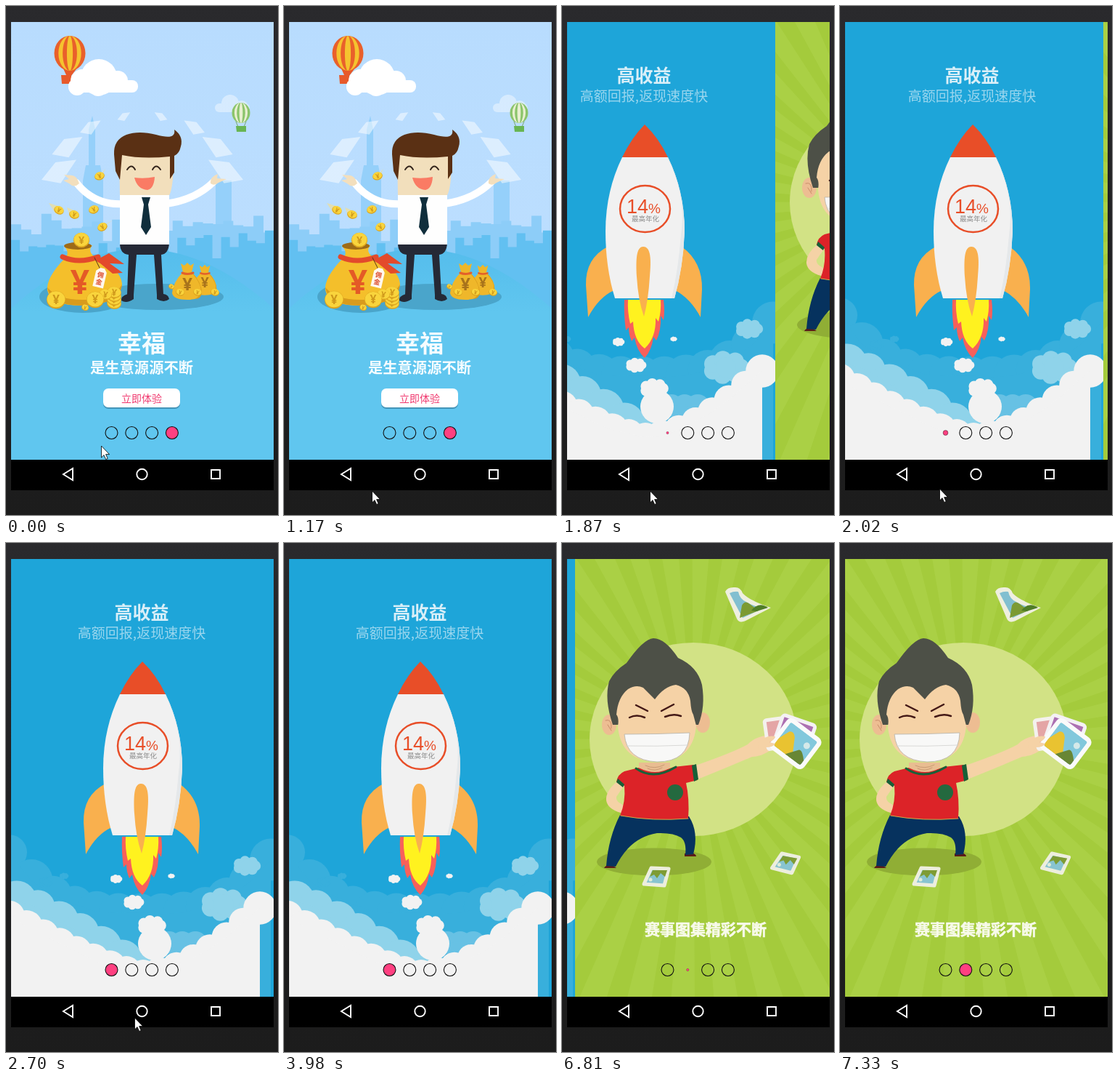
An HTML page for the animation above (8 s loop, 375 px wide and 700 px high).

```html
<!DOCTYPE html>
<html lang="zh">
<head>
<meta charset="utf-8">
<title>Intro pages</title>
<style>
html,body{margin:0;width:100%;height:100%;overflow:hidden;background:#202021}
svg{display:block;width:375px;height:700px}
text{font-family:"Noto Sans CJK SC","Noto Sans CJK",sans-serif;text-anchor:middle}
.num{font-family:"Liberation Sans",Arial,sans-serif;text-anchor:start}
.yen{font-family:"Noto Sans",sans-serif;font-weight:600}
.line{fill:none;stroke-linecap:round}
.heavy{font-weight:900;stroke-width:.6}
</style>
</head>
<body>
<svg viewBox="0 0 375 700">
<defs>
<linearGradient id="desk" x2="0" y2="1"><stop stop-color="#2a2a2d"/><stop offset=".5" stop-color="#202022"/><stop offset="1" stop-color="#1c1c1c"/></linearGradient>
<linearGradient id="sky" x2="0" y2="1"><stop stop-color="#b8dcfe"/><stop offset="1" stop-color="#bfe0ff"/></linearGradient>
<linearGradient id="land" x2="0" y2="1"><stop stop-color="#55bdec"/><stop offset=".3" stop-color="#60c6ef"/></linearGradient>
<clipPath id="screen"><path d="M7 22H369V624H7z"/></clipPath>
<clipPath id="hull"><path d="M157 208H220Q243 255 243 310Q241 360 229 402H147Q134 360 134 310Q134 255 157 208z"/></clipPath>
<clipPath id="picture"><rect x="-23" y="-20" width="46" height="40" rx="3"/></clipPath>
</defs>
<rect width="375" height="700" fill="url(#desk)"/>
<path d="M7 22H369V666H7z"/>
<g clip-path="url(#screen)">

<g class="page"><g clip-path="url(#screen)">
<path fill="#1ea5d9" d="M7 22H369V624H7z"/>
<text class="heavy" x="187" y="105" font-size="25" fill="#d9eff8">高收益</text>
<text x="187" y="131" font-size="19" font-weight="300" fill="#9ad6ee">高额回报,返现速度快</text>
<g id="clouds"></g>
<path fill="#f8605a" d="M160 404H214Q216 420 214 432L210 426Q211 446 204 460L200 455Q198 473 188 484Q177 474 174 456L170 461Q166 452 166 442L162 446Q159 424 160 404z"/>
<path fill="#fff21f" d="M165 404H210Q211 420 207 434L203 429Q204 456 188 471Q173 460 172 434L168 437Q164 420 165 404z"/>
<g fill="#f9b04e"><path d="M137 331Q106 347 107 384L110 428Q125 400 146 391z"/><path d="M239 331Q268 352 267 390L265 428Q251 402 230 391z"/></g>
<g clip-path="url(#hull)"><path fill="#f1f1f1" d="M130 200H250V410H130z"/><path fill="#e5e8ea" d="M219 208Q246 260 238 315Q234 365 225 402H250V200z"/></g>
<path fill="#e84e28" d="M188 163Q207 181 220 208H157Q170 181 188 163z"/>
<path fill="#f9b04e" d="M186 331C197 331 197 350 195 372Q193 405 187 427Q179 405 177 372C176 350 176 331 186 331z"/>
<ellipse cx="188.500" cy="279" rx="34.500" ry="32" fill="none" stroke="#e84e28" stroke-width="2.500"/>
<text class="num" x="163" y="285" font-size="27" fill="#e84e28">14<tspan font-size="19">%</tspan></text>
<text x="189" y="296" font-size="9.500" fill="#8b8b8b">最高年化</text>
</g></g>

<g class="page"><g clip-path="url(#screen)">
<path fill="#aad045" d="M7 22H369V624H7z"/>
<path id="rays" fill="#a4cb3c"/>
<ellipse cx="170" cy="270" rx="143" ry="133" fill="#d2e285"/>
<ellipse cx="116" cy="438.500" rx="79" ry="19" fill="#90ae35"/>
<path fill="#5a1a1a" d="M47 447Q50 442 58 443L64 447zM158 431V427L168 426Q174 428 174 431z"/>
<path fill="#06325e" d="M69 374L164 376Q178 398 170 428L159 429Q161 411 153 405Q142 398 120 399Q96 403 80 420Q70 431 63 445L50 444Q53 405 69 374z"/>
<path fill="#f5d2a6" d="M65 328Q49 341 50 354Q52 366 70 371Q78 375 85 374Q91 367 84 362Q76 363 71 359Q63 355 64 349Q69 341 75 334z"/>
<path fill="#f5d2a6" d="M173 306Q225 288 245 277Q257 264 282 264L285 279Q266 294 251 294Q214 310 176 325z"/>
<path fill="#dc2328" d="M75 314L95 309Q115 319 143 308L170 305L176 326L160 330Q165 352 163 379Q113 383 69 375Q77 356 75 334L64 328Q66 318 75 314z"/>
<path fill="#176038" d="M168 306L174 304L177 325L171 328zM66 324L75 332L73 336L64 329z"/>
<path class="line" stroke="#176038" stroke-width="3" d="M91 310Q115 327 146 308"/>
<path class="line" stroke="#c8ad4c" d="M70 375Q114 383 163 379"/>
<circle cx="145" cy="343" r="11" fill="#24693f"/>
<path fill="#e9bd91" d="M95 302H138V309Q118 321 95 309z"/>
<path class="line" stroke="#b98c66" stroke-width=".7" d="M104 306Q117 312 130 305M107 310Q117 315 127 309"/>
<g fill="#edbd92"><ellipse cx="54" cy="250" rx="10" ry="14"/><ellipse cx="183" cy="247" rx="10" ry="14"/></g>
<path class="line" stroke="#c98d69" d="M49 244Q58 241 57 255M52 250L57 258"/>
<path fill="#4d5047" d="M59 250Q47 215 54 190Q61 176 78 165Q101 132 115 131Q131 131 149 158Q176 170 182 195Q187 225 177 250z"/>
<path fill="#f5d2a6" d="M66 252Q68 241 64 236Q66 212 80 201Q91 194 101 199Q107 205 117 215Q130 197 146 195Q163 199 166 217Q167 232 170 236L174 251Q170 300 120 301Q70 300 66 252z"/>
<g class="line" stroke="#431816" stroke-width="2.500"><path d="M91 223L107 231M126 231L143 222"/><path d="M82 240Q92 235 103 240M131 239Q143 234 153 238"/></g>
<path fill="#f8f8f7" stroke="#b4b1aa" stroke-width=".8" d="M75 263Q120 263 165 261Q164 301 120 301Q78 299 75 263z"/>
<path class="line" stroke="#d1d1ce" stroke-width=".8" d="M78 279Q120 280 162 278"/>
<g transform="translate(288 261) rotate(-8)"><rect x="-20" y="-22" width="40" height="45" rx="5" fill="#f4f1ed"/><rect x="-15" y="-17" width="30" height="34" fill="#e4a5a6"/></g>
<g transform="translate(309 265) rotate(19)"><rect x="-26" y="-25" width="52" height="48" rx="6" fill="#f4f1f4"/><rect x="-21" y="-20" width="42" height="38" fill="#ac70b2"/></g>
<g transform="translate(311 276) rotate(37)"><rect x="-29" y="-26" width="58" height="52" rx="8" fill="#fafafa"/>
<g clip-path="url(#picture)"><path fill="#82c8dc" d="M-23-20H23V20H-23z"/><path fill="#e9c331" d="M-28 20L-17-8Q-12-13-6-6L9 20z"/><path fill="#688635" d="M-3 20L9 4Q13 1 23 12V20z"/><circle cx="14" cy="-7" r="4.500" fill="#d5e9e9"/></g></g>
<path fill="#f5d2a6" d="M258 276Q269 263 283 266Q283 270 275 274L283 276Q280 281 270 281L264 292z"/>
<path fill="#efefdf" d="M214 67Q217 60 228 61Q235 61 238 69Q247 79 277 89L242 107Q233 111 230 104z"/>
<path fill="#82bfd0" d="M220 69Q226 66 232 67Q234 77 243 81Q254 88 268 89L238 103z"/>
<path fill="#7c9a32" d="M234 103L237 86Q241 78 248 84L260 93z"/><path fill="#4f7d26" d="M250 93Q260 80 273 89L257 94z"/>
<g id="cards"></g>
<text class="heavy" x="187" y="539" font-size="21" fill="#f8faeb" stroke="#f8faeb">赛事图集精彩不断</text>
</g></g>

<g class="page"><g clip-path="url(#screen)">
<path fill="#18b463" d="M7 22H369V624H7z"/>
<g transform="translate(-282)">
<path fill="#fbe9cc" d="M349 208H369V307Q360 309 352 301Q336 294 332 270Q332 254 348 250z"/>
<path fill="#6b3a12" d="M369 142Q351 146 341 159L346 159Q333 176 333 190L338 187Q331 201 336 205H347V241H353V209L369 197z"/>
<path fill="#301713" d="M346 206Q354 206 354 218V244L346 242z"/>
<path fill="#20338d" d="M350 238Q358 235 369 236V246Q359 256 361 270Q363 285 369 291V301Q354 288 353 267Q352 250 357 244L350 245z"/>
<path fill="#ef3652" d="M354 425L369 414V439z"/>
</g>
</g></g>

<g class="page"><g clip-path="url(#screen)">
<path fill="url(#sky)" d="M7 22H369V624H7z"/>
<path fill="#95d0fa" d="M106 420V240L110 219H114V170L119 151L123 170V219H130L134 240V420zM289 420V240H311V420z"/>
<path id="far" fill="#8dcdf8"/><path id="near" fill="#62c0f1"/>
<path fill="url(#land)" d="M7 416Q97 334 187 334T369 416V624H7z"/>
<g fill="#fff" opacity=".42"><circle cx="309" cy="134" r="12"/><circle cx="325" cy="139" r="9"/><rect x="288" y="134" width="48" height="12" rx="6"/></g>
<path id="papers" fill="#fff" opacity=".5"/>
<path fill="#e75a2b" d="M78 84H99L90 96V107H77L76 95H83z"/>
<g id="balloons"></g>
<g fill="#fff"><circle cx="128" cy="98" r="25"/><circle cx="105" cy="103" r="16"/><circle cx="98" cy="111" r="12"/><circle cx="154" cy="103" r="14"/><rect x="86" y="102" width="96" height="17" rx="8"/><circle cx="127" cy="112" r="12"/></g>
<path class="line" stroke="#7aa76d" d="M317 159L320 166M331 159L328 166"/><path fill="#68b553" d="M317 165H331V173H318z"/>
<g fill="#4aa5cb"><ellipse cx="106" cy="400" rx="60" ry="22"/><ellipse cx="210" cy="400" rx="90" ry="18"/></g>
<path class="line" stroke="#fff" stroke-width="10" d="M163 272Q122 275 97 243M220 272Q260 267 286 242"/>
<path fill="#f3dfbd" d="M101 244Q94 251 87 244L79 240L87 238L80 232L91 233Q97 233 101 244zM282 244Q281 235 292 231L291 237L304 238L293 243Q287 248 282 244z"/>
<path fill="#252936" d="M157 326H225Q224 341 214 342L217 397H208L204 342H180L176 397H167L169 342Q157 341 157 326z"/>
<path fill="#252936" d="M176 395V403Q166 410 159 405Q158 399 168 396zM208 395V403Q218 409 225 403Q224 397 217 396z"/>
<path fill="#fefefe" d="M157 259H225V328H157z"/>
<path fill="#f2dfbc" d="M156 203H230V238Q228 256 225 260H157z"/>
<path fill="#5a3014" d="M149 204Q148 184 166 177Q183 171 207 177Q235 185 232 170Q245 179 241 193Q239 203 232 206V229L226 238V207Q188 211 160 205L157 239L151 227z"/>
<path class="line" stroke="#34251c" stroke-width="2" d="M167 225Q173 216 178 225M202 225Q207 216 213 225"/>
<path fill="#fa7b64" d="M177 236Q191 238 205 235Q204 251 195 253Q181 252 177 236z"/>
<path fill="#102e3c" d="M187 263H199L196 273L200 304L193 315L186 304L190 273z"/>
<path fill="#f4bf2b" d="M80 330Q89 340 81 347Q55 374 57 391Q61 412 105 412Q158 410 160 382Q158 361 122 345Q112 337 119 329z"/>
<path fill="#d89b1d" d="M57 387Q61 412 105 412Q157 411 160 383Q148 403 109 404Q72 405 57 387z"/>
<ellipse cx="99" cy="330" rx="19" ry="5" fill="#9e6b17"/>
<path class="line" stroke="#e34a2b" stroke-width="7" d="M78 345Q100 355 127 345"/>
<path fill="#e34a2b" d="M123 350L142 340L163 355L143 354L161 367L147 368L130 354z"/>
<path class="line" stroke="#5b351b" d="M122 346L130 362"/>
<g transform="rotate(13 129 374)"><path fill="#fff8ee" d="M122 365L127 360H133L137 365V387H122z"/><text font-size="9" font-weight="700" fill="#dc4b2c"><tspan x="129.500" y="373">佣</tspan><tspan x="129.500" y="383">金</tspan></text></g>
<text class="yen" x="102" y="396" font-size="46" fill="#e45a26">¥</text>
<g id="money"></g>
<text x="187" y="476" font-size="33" font-weight="700" fill="#f5fcff">幸福</text>
<text x="187" y="505" font-size="20.300" font-weight="700" fill="#f5fcff">是生意源源不断</text>
<rect x="134" y="528" width="106" height="26" rx="7" fill="#4595b8"/><rect x="134" y="526" width="106" height="26" rx="7" fill="#fff"/>
<text x="187" y="544.500" font-size="14" fill="#f03b70">立即体验</text>
</g></g>
<g id="dots" stroke="#111"></g>
</g>
<g fill="none" stroke="#fff" stroke-width="1.900"><path d="M92 636V652L79 644z"/><circle cx="187.500" cy="644" r="7.200"/><path d="M283 638H295V650H283z"/></g>
<path id="cursor" fill="#fff" stroke="#000" stroke-width=".8" d="M.5 0V16L4 12.600L6.700 18.500L9.200 17.400L6.600 11.600H11.600z"/>
</svg>
<script>
const $ = id => document.getElementById(id);
const range = (n, f) => Array.from({length: n}, (_, i) => f(i));
const join = (n, f) => range(n, f).join('');
let seed = 7;
const rand = () => (seed = seed * 16807 % 2147483647) / 2147483647;
const circle = (x, y, r) => `<circle cx="${x}" cy="${y}" r="${r}"/>`;

// A row of round lobes whose tops follow top(x), filled down to the ground
function bank(fill, x0, x1, step, top) {
  let lobes = '', ridge = '';
  for (let x = x0; x <= x1; x += step) {
    const r = step * (.8 + .2 * rand()), y = top(x) + r;
    lobes += circle(x, y, r);
    ridge += `L${x} ${y}`;
  }
  return `<g fill="${fill}">${lobes}<path d="M${x0} 624${ridge}V624z"/></g>`;
}
const puff = (fill, x, y, s) => `<g fill="${fill}" transform="translate(${x} ${y}) scale(${s})">` +
  join(7, i => circle(20 * Math.cos(i * .9), 11 * Math.sin(i * .9), 12)) + circle(0, 0, 14) + '</g>';
const side = x => (x - 187) / 180;

$('clouds').innerHTML =
  bank('#38afdc', 5, 371, 30, x => 482 - 78 * Math.abs(side(x)) ** 3) +
  puff('#38afdc', 55, 466, .3) + puff('#38afdc', 80, 458, .2) +
  bank('#67c1e4', 225, 262, 18, () => 534) +
  bank('#8fd3ea', 15, 190, 29, x => 462 + 98 * Math.max(0, (x - 7) / 175) ** 1.2) +
  puff('#8fd3ea', 300, 497, 1) + puff('#8fd3ea', 332, 444, .6) +
  bank('#f2f2f2', 5, 372, 23, x => 573 - (x < 187 ? 80 * (-side(x)) ** 1.3 : 112 * side(x) ** 1.8)) +
  `<g fill="#f2f2f2">${circle(205, 551, 23)}</g>` + puff('#f2f2f2', 201, 526, .62) +
  puff('#f2f2f2', 176, 494, .45) + puff('#f2f2f2', 152, 462, .26) + puff('#f2f2f2', 228, 458, .15);

const rayEnd = a => `L${170 + 560 * Math.cos(a)} ${270 + 560 * Math.sin(a)}`;
$('rays').setAttribute('d', join(38, i => {
  const a = i * Math.PI / 19 + .04;
  return `M170 270${rayEnd(a - .037)}${rayEnd(a + .037)}z`;
}));

const card = (x, y, turn) => `<g transform="translate(${x} ${y}) rotate(${turn})" stroke-linejoin="round">
<path fill="#88c4d0" stroke="#edeedd" stroke-width="5" d="M-7 -12L17 -11L11 12L-17 10z"/>
<path fill="#7e9c34" d="M-5 -9L15 -9L12 0L6 -5L1 2L-3 -3L-9 0z"/><circle cx="-8" cy="4" r="2.500" fill="#e0ecd9"/></g>`;
$('cards').innerHTML = card(119, 459, 0) + card(297, 440, 10);

const skyline = (n, base, drop) => 'M7 420' + join(n, i => {
  const x = 7 + (i + 1) * 362 / n;
  return `V${base + drop * (1 - Math.abs(side(x))) + 36 * (rand() - .5)}H${x}`;
}) + 'V420z';
$('far').setAttribute('d', skyline(26, 297, 15));
$('near').setAttribute('d', skyline(30, 322, 18));

// Sheets tossed along an arch, larger towards the hands
$('papers').setAttribute('d', join(8, i => {
  const a = Math.PI * i / 7, c = Math.cos(a), s = 8 + 16 * c * c, k = c > 0 ? 1 : -1;
  return `M${188 - 115 * c - s * k} ${227 - 77 * Math.sin(a) + s * .5}l${s * .8 * k} ${-s}l${s * 1.2 * k} ${-s * .15}l${-s * .9 * k} ${s * 1.35}z`;
}));

const balloon = (x, y, rx, ry, a, b) => join(4, i => `<ellipse cx="${x}" cy="${y}" rx="${rx * (1 - i * .27)}" ry="${ry}" fill="${i % 2 ? b : a}"/>`);
$('balloons').innerHTML = balloon(88, 65, 21.5, 24, '#e9602b', '#f5c32f') + balloon(324, 147, 12.5, 14, '#8bc46b', '#e8efd0');

const coin = (x, y, r, turn = 0) => `<g transform="translate(${x} ${y}) rotate(${turn})">
<ellipse rx="${r}" ry="${r * (turn ? .78 : .94)}" fill="#dca51f"/><ellipse cy="-.8" rx="${r - .6}" ry="${r * (turn ? .7 : .85)}" fill="#f9d43c"/>
<text class="yen" y="${r * .45}" font-size="${r * 1.3}" fill="#cf981b">¥</text></g>`;
const flying = (x, y, dx) => `<path d="M${x - 5} ${y + 4}L${x + dx} ${y - 10}L${x + 5} ${y - 4}z" fill="#f9df83" opacity=".6"/>` + coin(x, y, 7, -2 * dx);
const bag = (x, y, s) => `<g transform="translate(${x} ${y}) scale(${s})">
<path fill="#efb72a" d="M-9 -26L-4 -23L0 -27L4 -23L9 -26L6 -14Q21 0 20 15Q17 24 0 24Q-19 24 -21 15Q-20 0 -6 -14z"/>
<path fill="#d99c1d" d="M7 -12Q28 12 11 23Q19 22 20 15Q20 0 6 -14z"/><path class="line" stroke="#e3602a" stroke-width="3" d="M-7 -13Q0 -10 8 -13"/>
<text class="yen" y="11" font-size="24" fill="#a8731b">¥</text></g>`;
$('money').innerHTML =
  flying(73, 281, -14) + flying(94, 287, -10) + flying(121, 280, 10) + flying(133, 304, 15) + flying(129, 234, 8) +
  coin(104, 322, 11) + coin(69, 404, 13) + join(4, i => coin(149, 409 - 5 * i, 10, 8)) + coin(137, 397, 9, 10) + coin(123, 404, 12) + coin(109, 415, 5, 20) +
  bag(274, 378, .82) + bag(250, 380, 1) + coin(228, 386, 4, 30) + join(3, i => coin(240 + 24 * i, 394, 6, 15));

$('dots').innerHTML = join(4, i => circle(145.5 + 27.8 * i, 587, 8.5));
const dots = [...$('dots').children], pages = [...document.querySelectorAll('.page')];

// Swipes: the page scrolls with a quintic ease-out in coarse ticks, then its dot pops in
const TICK = 134;
const swipes = [{at: -5000, from: 3, to: 3, lead: 0}, {at: 1720, from: 3, to: 0, lead: .165}, {at: 6660, from: 0, to: 1, lead: .251}];

// [time, x, y]
const pointer = [[0, 131, 605], [120, 123, 642], [270, 83, 677], [430, 102, 684], [550, 113, 681], [1010, 118, 674], [1170, 121, 667],
  [2020, 137, 664], [2150, 152, 661], [2300, 166, 658], [2430, 174, 656], [2700, 177, 653], [3290, 181, 661], [3560, 188, 663],
  [3710, 219, 663], [3860, 252, 679], [3980, 400, 710]];

function draw(t) {
  const {at, from, to, lead} = swipes.findLast(s => s.at <= t);
  const tick = Math.floor((t - at) / TICK);
  const pos = to + (from - to) * (1 - Math.min(1, lead + tick / 4)) ** 5;
  const pop = Math.min(1, tick / 5);
  pages.forEach((p, i) => {
    const dx = Math.round((i - pos) * 361);
    p.setAttribute('transform', `translate(${dx})`);
    p.setAttribute('display', Math.abs(dx) < 361 ? 'inline' : 'none');
  });
  dots.forEach((d, i) => {
    const k = i === to ? pop : 1;
    d.setAttribute('r', 8.5 * k);
    d.setAttribute('fill', i === to ? '#ff4081' : 'none');
    d.setAttribute('stroke-width', 1.1 * k);
  });
  const [, x, y] = pointer.findLast(p => p[0] <= t);
  $('cursor').setAttribute('transform', `translate(${x} ${y})`);
}
const start = performance.now();
function tick(now) {
  draw(Math.max(0, now - start) % 8000);
  requestAnimationFrame(tick);
}
draw(0);
requestAnimationFrame(tick);
</script>
</body>
</html>
```
